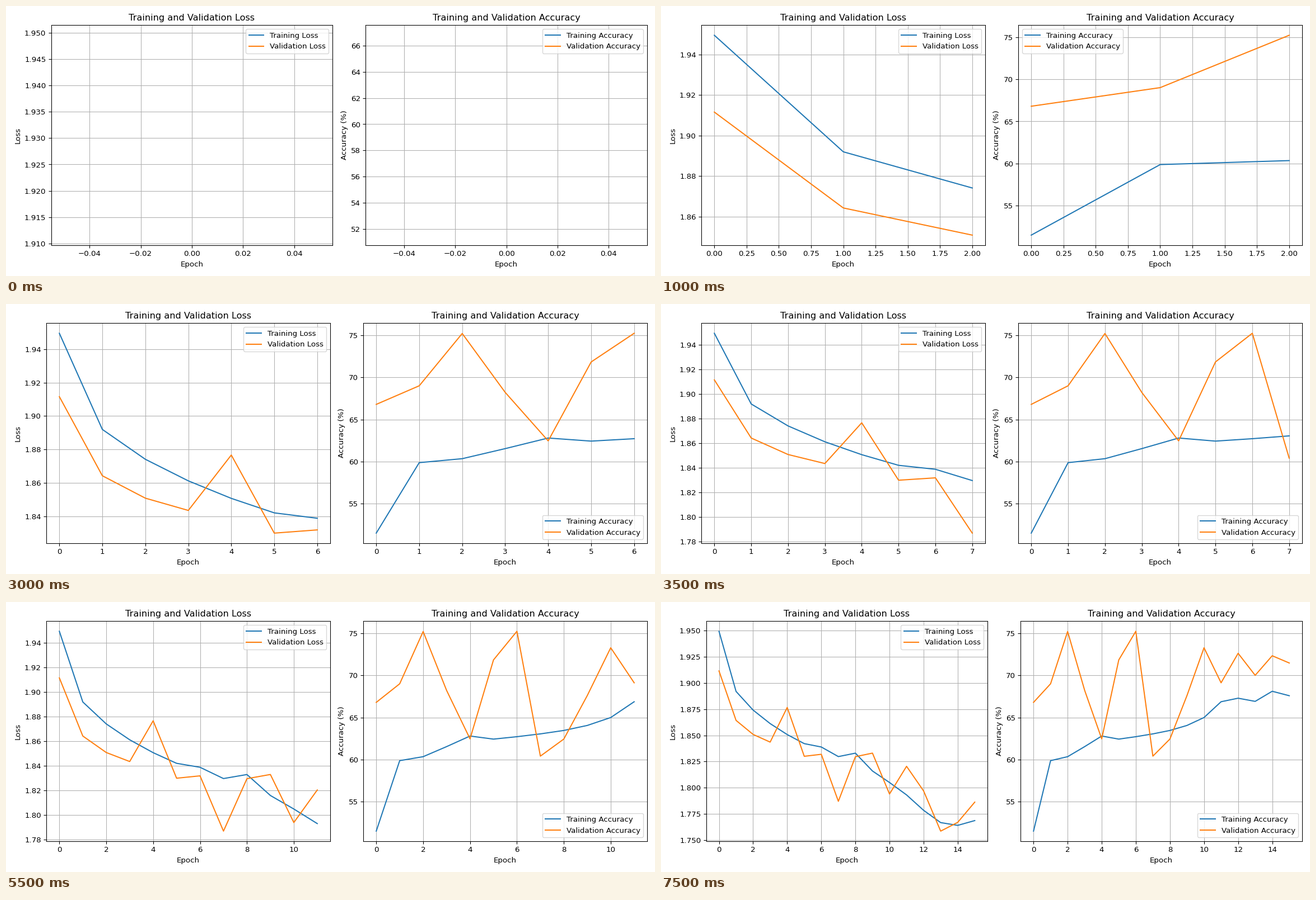
Recreate the animation shown at these times as a matplotlib script. Size 1159 px wide and 483 px high, loop 8000 ms.

```python
import matplotlib.pyplot as plt
import numpy as np
from matplotlib.animation import FuncAnimation

EPOCHS = 16
epochs = np.arange(EPOCHS, dtype=float)


def curve(start, gain, power, bumps):
    """Power-law trend plus Gaussian bumps given as (centre, height, width)."""
    y = start + gain * epochs**power
    for centre, height, width in bumps:
        y += height * np.exp(-((epochs - centre) / width)**2)
    return y


# Alternating swings that die out towards the last epochs.
fading = [(k, 2.7 * (-0.8)**(k - 10), 0.6) for k in range(10, 15)]

train_loss = curve(1.9495, -0.0575, 0.39,
                   [(6, 0.005, 0.6), (8, 0.013, 0.8), (13.3, -0.027, 2.3)])
val_loss = curve(1.9116, -0.0473, 0.36,
                 [(4, 0.043, 0.58), (6, 0.012, 0.58), (7, -0.030, 0.58),
                  (8.55, 0.048, 0.58), (10, -0.0105, 0.58),
                  (11, 0.0215, 0.58), (13.43, -0.059, 0.58)])
train_acc = curve(51.52, 8.4, 0.16,
                  [(2, -0.55, 0.6), (4, 0.8, 0.6), (11, 0.75, 0.6),
                   (13, -1.2, 0.6), (13.4, 4, 3.2)])
val_acc = curve(66.8, 2.1, 0.29,
                [(2, 5.86, 0.5), (4, -7.5, 0.8), (5.65, 7.75, 0.7),
                 (7.4, -12.5, 0.9), (9, -2.8, 0.6)] + fading)

fig, (loss_ax, acc_ax) = plt.subplots(1, 2, figsize=(12, 5), dpi=96.61)


def draw_metric(ax, name, unit, train, val, epoch):
    ax.clear()
    ax.plot(train[:epoch + 1], label=f"Training {name}")
    ax.plot(val[:epoch + 1], label=f"Validation {name}")
    ax.set_title(f"Training and Validation {name}")
    ax.set_xlabel("Epoch")
    ax.set_ylabel(name + unit)
    ax.legend()
    ax.grid(True)


def update(epoch):
    draw_metric(loss_ax, "Loss", "", train_loss, val_loss, epoch)
    draw_metric(acc_ax, "Accuracy", " (%)", train_acc, val_acc, epoch)
    fig.tight_layout()


anim = FuncAnimation(fig, update, frames=EPOCHS, init_func=lambda: None,
                     interval=500, repeat=True, repeat_delay=0)
plt.show()
```
